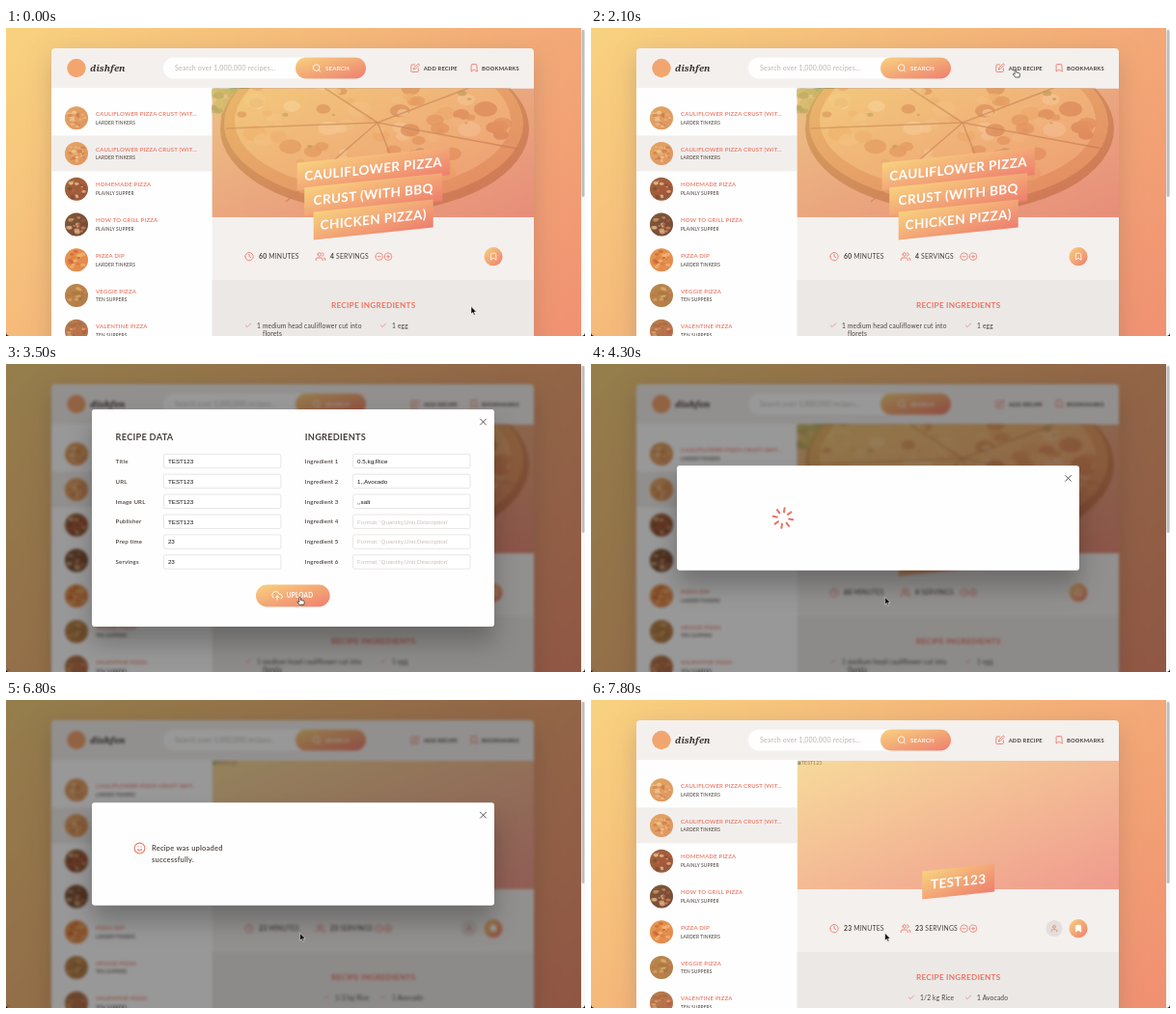
These frames come from a looping animation (600 by 319 pixels, 7.9 s). An HTML page:

```html
<!DOCTYPE html>
<html lang="en">
<head>
<meta charset="utf-8">
<title>Recipe upload</title>
<style>
html, body { margin: 0; width: 100%; height: 100%; overflow: hidden; background: #111; }
#stage { position: relative; width: 600px; height: 319px; overflow: hidden; border-radius: 0 0 4px 4px; }
svg, #veil { position: absolute; left: 0; top: 0; }
#veil { width: 596px; height: 319px; background: rgba(0,0,0,.4); backdrop-filter: blur(1.67px); }
text { font-family: Lato, "Open Sans", sans-serif; letter-spacing: .03em; white-space: pre; }
.input { font-family: "Liberation Sans", Arial, sans-serif; letter-spacing: 0; }
.brand { font-family: "Noto Serif", serif; font-style: italic; letter-spacing: 0; }
#card { filter: drop-shadow(0 8px 12px rgba(97,85,81,.25)); }
#sheet { filter: drop-shadow(0 16px 12px rgba(0,0,0,.25)); }
</style>
</head>
<body>
<div id="stage">
  <svg id="page" width="600" height="319"></svg>
  <div id="veil"></div>
  <svg id="top" width="600" height="319"></svg>
</div>
<script>
const $ = id => document.getElementById(id);
const CORAL = '#ea7562', DARK = '#4a403c', GRAD = 'url(#grad)';
const LOOP = 7900, OPEN = 2150, SUBMIT = 3750, DONE = 4370, CLOSE = 6870, FADE = 500;

let seed = 7;
const rnd = () => (seed = (seed * 16807) % 2147483647) / 2147483647;

const rect = (x, y, w, h, fill, more = '') =>
  `<rect x="${x}" y="${y}" width="${w}" height="${h}" fill="${fill}" ${more}/>`;
const ell = (x, y, rx, ry, fill, more = '') =>
  `<ellipse cx="${x}" cy="${y}" rx="${rx}" ry="${ry}" fill="${fill}" ${more}/>`;
const text = (x, y, size, str, fill = DARK, weight = 400, more = '') =>
  `<text x="${x}" y="${y}" font-size="${size}" fill="${fill}" font-weight="${weight}" ${more}>${str}</text>`;
const ring = (x, y, r) => `M${x - r} ${y}a${r} ${r} 0 1 0 ${2 * r} 0a${r} ${r} 0 1 0 ${-2 * r} 0`;

// Line icons on a 24-unit grid
const ICONS = {
  search: ring(11, 11, 8) + 'M21 21l-4.3-4.3',
  edit: 'M11 4H4a2 2 0 0 0-2 2v14a2 2 0 0 0 2 2h14a2 2 0 0 0 2-2v-7M18.5 2.5a2.1 2.1 0 0 1 3 3L12 15l-4 1 1-4z',
  bookmark: 'M19 21l-7-5-7 5V5a2 2 0 0 1 2-2h10a2 2 0 0 1 2 2z',
  clock: ring(12, 12, 10) + 'M12 6v6l4 2',
  users: ring(9, 7, 4) + 'M17 21v-2a4 4 0 0 0-4-4H5a4 4 0 0 0-4 4v2M23 21v-2a4 4 0 0 0-3-3.9M16 3.1a4 4 0 0 1 0 7.8',
  user: ring(12, 7, 4) + 'M20 21v-2a4 4 0 0 0-4-4H8a4 4 0 0 0-4 4v2',
  minus: ring(12, 12, 10) + 'M8 12h8',
  plus: ring(12, 12, 10) + 'M8 12h8M12 8v8',
  check: 'M20 6L9 17l-5-5',
  smile: ring(12, 12, 10) + 'M8 14s1.5 2 4 2 4-2 4-2M9 9h.01M15 9h.01',
  cloud: 'M16 16l-4-4-4 4M12 12v9M20.4 18.4A5 5 0 0 0 18 9h-1.3A8 8 0 1 0 3 16.3',
  close: 'M19 5L5 19M5 5l14 14',
  loader: 'M12 2v4M12 18v4M5 5l2.8 2.8M16.2 16.2L19 19M2 12h4M18 12h4M5 19l2.8-2.8M16.2 7.8L19 5'
};
const icon = (name, x, y, size, color = CORAL, fill = 'none') =>
  `<path d="${ICONS[name]}" transform="translate(${x} ${y}) scale(${size / 24}) translate(-12 -12)" fill="${fill}"
    stroke="${color}" stroke-width="2" stroke-linecap="round" stroke-linejoin="round"/>`;

const blobs = (n, x, y, rx, ry, size, colors) => {
  let out = '';
  for (let i = 0; i < n; i++) {
    const a = rnd() * 6.283, d = Math.sqrt(rnd()), s = size * (.4 + rnd());
    out += ell((x + Math.cos(a) * d * rx).toFixed(1), (y + Math.sin(a) * d * ry).toFixed(1),
      s.toFixed(1), (s * .65).toFixed(1), colors[i % colors.length], 'opacity=".75"');
  }
  return out;
};

function sidebar() {
  const pubs = ['LARDER TINKERS', 'PLAINLY SUPPER', 'TEN SUPPERS'];
  const long = 'CAULIFLOWER PIZZA CRUST (WIT...';
  const cheese = ['#dc9a5c', '#f0d2a4', '#c0703e', '#e9b377'];
  const items = [
    [long, 0, cheese], [long, 0, cheese],
    ['HOMEMADE PIZZA', 1, ['#8a4a2c', '#e6c29a', '#b8442c', '#5a3a26']],
    ['HOW TO GRILL PIZZA', 1, ['#5d3a2a', '#c98a58', '#8a4228', '#dcb888']],
    ['PIZZA DIP', 0, ['#e08a44', '#f0bb70', '#c4502c', '#d87438']],
    ['VEGGIE PIZZA', 2, ['#a87840', '#d8a860', '#7c7838', '#b85830']],
    ['VALENTINE PIZZA', 2, ['#a86840', '#d8a070', '#b84a30', '#80603c']]
  ];
  return rect(47, 111.5, 166.7, 36.8, '#f2eeec') + items.map(([name, pub, colors], i) => {
    const y = 93.2 + 36.75 * i;
    return ell(73, y, 12, 12, colors[0]) + blobs(22, 73, y, 9, 9, 2.1, colors.slice(1)) +
      ell(73, y, 12, 12, GRAD, 'opacity=".2"') +
      text(93, y - 2.3, 6.04, name, CORAL, 600) + text(93, y + 6.4, 4.8, pubs[pub], '#5f5551', 600);
  }).join('');
}

function header() {
  return rect(47, 62, 166.7, 260, '#fefefe') +
    ell(73, 41.5, 9.7, 9.7, '#f2a56f') +
    text(87, 45, 9.6, 'dishfen', '#3a322f', 700, 'class="brand"') +
    rect(163, 30.5, 209, 22, '#fefefe', 'rx="11"') +
    text(175, 44, 7, 'Search over 1,000,000 recipes...', '#bdb4b0') +
    rect(300, 30.5, 73, 22, GRAD, 'rx="11"') + icon('search', 322, 41.5, 10, '#fff') +
    text(331, 43.8, 6.2, 'SEARCH', '#fff', 600) +
    icon('edit', 424, 41.3, 10) + text(432.7, 43.6, 5.75, 'ADD RECIPE', DARK, 700) +
    icon('bookmark', 485, 41.3, 10) + text(493, 43.6, 5.75, 'BOOKMARKS', DARK, 700);
}

function photo() {
  const cuts = [[228, 104], [290, 180], [420, 186], [530, 125], [480, 62], [330, 62]];
  return rect(213, 62, 335, 135, '#dca58c') +
    blobs(26, 232, 74, 32, 22, 9, ['#6f8a34', '#93a048', '#54722c']) +
    ell(382, 104, 160, 87, '#9c5a2c') + ell(381, 99, 155, 82, '#d08c4c') + ell(380, 96, 143, 72, '#eabb78') +
    blobs(95, 380, 94, 138, 70, 9, ['#f6e2b6', '#c9743a', '#eec888', '#b5572c', '#e3a35c']) +
    blobs(16, 380, 94, 130, 65, 4, ['#71803a']) +
    cuts.map(([x, y]) => `<path d="M385 98L${x} ${y}" stroke="#8a4a28" stroke-width="1.6" opacity=".7"/>`).join('');
}

const banner = (lines, y) => lines.map(([str, w], i) =>
  `<g transform="translate(380.7 ${y + 26.2 * i}) skewY(-6)">` + rect(-w / 2, -14.5, w, 29, GRAD) +
  text(0, 4.8, 13.5, str, '#fff', 700, 'text-anchor="middle"') + '</g>').join('');

const details = (mins, servings) =>
  icon('clock', 252, 236.7, 10) + text(262, 239.2, 6.8, `<tspan font-weight="700">${mins}</tspan> MINUTES`) +
  icon('users', 326, 236.7, 10.5) + text(336, 239.2, 6.8, `<tspan font-weight="700">${servings}</tspan> SERVINGS`) +
  icon('minus', 386.7, 236.7, 9) + icon('plus', 396, 236.7, 9) + ell(505, 236.7, 9.6, 9.6, GRAD);

const ingredient = (x, str) => icon('check', x, 308, 8) + text(x + 9, 310.6, 6.6, str);

$('page').innerHTML = `<defs>
  <linearGradient id="grad" x2="1" y2="1"><stop stop-color="#f8d27f"/><stop offset="1" stop-color="#ee7e6e"/></linearGradient>
  <clipPath id="hero">${rect(213.7, 62.7, 333.3, 133.3, '#000')}</clipPath></defs>` +
  rect(0, 0, 596, 581, GRAD, 'id="back"') +
  rect(47, 21, 500, 320, '#f4f0ee', 'rx="4" id="card"') + header() + sidebar() +
  rect(213.7, 261, 333.3, 60, '#ebe8e6') +
  `<g clip-path="url(#hero)"><g id="photo">${photo()}</g>` +
  rect(213.7, 62.7, 333.3, 133.3, GRAD, 'opacity=".62" id="tint"') + '</g>' +
  text(380.7, 290, 8.2, 'RECIPE INGREDIENTS', CORAL, 700, 'text-anchor="middle"') +
  '<g id="before">' +
    banner([['CAULIFLOWER PIZZA', 158], ['CRUST (WITH BBQ', 143], ['CHICKEN PIZZA)', 124]], 146) +
    details(60, 4) + icon('bookmark', 505, 236.7, 9, '#fff') +
    ingredient(251, '1 medium head cauliflower cut into') + text(266, 319.4, 6.6, 'florets') +
    ingredient(391, '1 egg') +
  '</g><g id="after">' +
    rect(214.5, 63.5, 3, 3.6, '#8fa070') + text(218, 67, 5, 'TEST123', '#9a7c50') +
    banner([['TEST123', 75]], 188) + details(23, 23) +
    ell(480, 236.7, 8.6, 8.6, '#e4dfdc') + icon('user', 480, 236.7, 8.5) +
    icon('bookmark', 505, 236.7, 9, '#fff', '#fff') +
    ingredient(332, '1/2 kg Rice') + ingredient(391, '1 Avocado') +
  '</g>';

function form() {
  const left = [['Title', 'TEST123'], ['URL', 'TEST123'], ['Image URL', 'TEST123'],
    ['Publisher', 'TEST123'], ['Prep time', '23'], ['Servings', '23']];
  const right = ['0.5,kg,Rice', '1,,Avocado', ',,salt', '', '', ''].map((v, i) => ['Ingredient ' + (i + 1), v]);
  const column = (x, title, rows) => text(x, 78.8, 9.2, title, DARK, 700) + rows.map(([label, value], i) => {
    const y = 100.5 + 20.9 * i;
    return text(x, y + 2.2, 6.1, label, DARK, 600) +
      rect(x + 49.8, y - 7.2, 121.4, 14.4, '#fff', 'rx="1.6" stroke="#d9d5d3" stroke-width=".6"') +
      text(x + 54.3, y + 2.3, 6.25, value || "Format: 'Quantity,Unit,Description'",
        value ? '#111' : '#c9bfba', 400, 'class="input"');
  }).join('');
  return column(113.6, 'RECIPE DATA', left) + column(309.8, 'INGREDIENTS', right) +
    '<g id="upload">' + rect(-36.7, -10.9, 73.4, 21.8, GRAD, 'rx="10.9"') +
    icon('cloud', -15.5, 0, 11, '#fff') + text(-6.3, 2.3, 6.2, 'UPLOAD', '#fff', 700) + '</g>';
}

$('top').innerHTML = '<g id="modal">' + rect(89, 47, 417, 225, '#fefefe', 'rx="3" id="sheet"') +
  `<g id="cross">${icon('close', 494.5, 13, 10, '#333')}</g><g id="form">${form()}</g>` +
  `<g id="spinner">${icon('loader', 0, 0, 25)}</g><g id="message">` +
  icon('smile', 138.5, 153.5, 13) + text(151, 156.3, 7.5, 'Recipe was uploaded', DARK, 600) +
  text(151, 167.6, 7.5, 'successfully.', DARK, 600) + '</g></g>' +
  rect(596, 0, 4, 319, '#f8f8f8') + rect(596.6, 2, 2.9, 173, '#bdbdbd', 'rx="1.4" id="thumb"') +
  `<g id="cursor"><path id="arrow" d="M0 0V7.6L1.8 6 3 8.8 4.2 8.3 3 5.6H5.4Z" stroke="#fff" stroke-width=".5"/>
  <path id="hand" d="M-.9.6a.8.8 0 0 1 1.6 0V3l3 .8q.9.3.8 1.4L4 8H-.3L-2.6 5.2q-.1-1 1.1-.6l.6.5Z"
    fill="#fff" stroke="#222" stroke-width=".7"/></g>`;

const clamp = x => Math.max(0, Math.min(1, x));
// The CSS "ease" curve
function ease(x) {
  x = clamp(x);
  let a = 0, b = 1, s = 0;
  for (let i = 0; i < 20; i++) {
    s = (a + b) / 2;
    if (.75 * s * (1 - s) + s ** 3 < x) a = s; else b = s;
  }
  return .3 * s * (1 - s) ** 2 + 3 * s * s * (1 - s) + s ** 3;
}

// Pointer stops: time, x, y
const PATH = [[0, 482, 288.5], [350, 482, 288.5], [1150, 366, 46], [1400, 378, 48.5], [1900, 440, 43],
  [2200, 440, 43], [2400, 432.5, 53.5], [3200, 304.7, 241.5], [LOOP, 304.7, 241.5]];
function pointer(t) {
  const i = PATH.findIndex(p => p[0] > t), [t0, x0, y0] = PATH[i - 1], [t1, x1, y1] = PATH[i];
  let k = (t - t0) / (t1 - t0);
  k = k * k * (3 - 2 * k);
  return [x0 + (x1 - x0) * k, y0 + (y1 - y0) * k];
}

const show = (id, on) => $(id).style.display = on ? '' : 'none';
const move = (id, value) => $(id).setAttribute('transform', value);

function draw(t) {
  const done = t >= DONE, filling = t < SUBMIT;
  show('photo', !done);
  show('before', !done);
  show('after', done);
  $('tint').setAttribute('opacity', done ? .75 : .62);
  $('back').setAttribute('height', done ? 535 : 581);
  $('thumb').setAttribute('height', done ? 188 : 173);

  const level = t < CLOSE ? ease((t - OPEN) / FADE) : 1 - ease((t - CLOSE) / FADE);
  $('veil').style.opacity = $('modal').style.opacity = level;
  show('veil', level > 0);
  const height = filling ? 225 : done ? 106.5 : 108.3, y = 159.5 - height / 2;
  $('sheet').setAttribute('y', y);
  $('sheet').setAttribute('height', height);
  move('cross', `translate(0 ${y})`);
  show('form', filling);
  show('spinner', !filling && !done);
  show('message', done);
  move('spinner', `translate(199 159.5) rotate(${(t - SUBMIT) * .18})`);
  move('upload', `translate(297.3 240) scale(${1 + .045 * ease((t - 3050) / 200)})`);

  const hand = t > 1000 && t < 1450 || t > 1680 && t < 2250 || t > 3000 && filling;
  show('hand', hand);
  show('arrow', !hand);
  move('cursor', `translate(${pointer(t)})`);
}

const start = performance.now();
function tick() {
  draw((performance.now() - start) % LOOP);
  requestAnimationFrame(tick);
}
tick();
</script>
</body>
</html>
```
